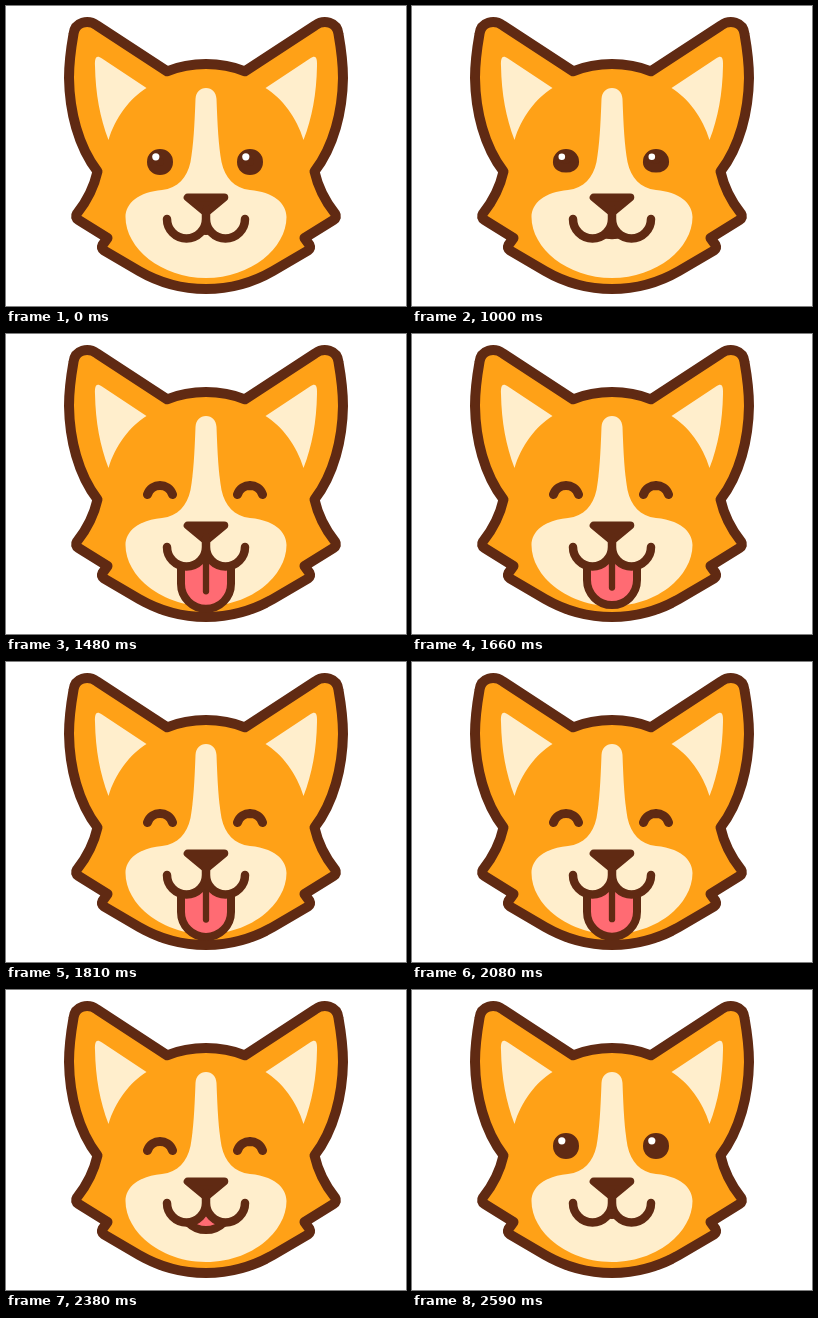
An HTML page that plays this animation: 400x300 px, repeating every 2920 ms.

```html
<!DOCTYPE html>
<html lang="en">
<head>
<meta charset="utf-8">
<title>Happy corgi</title>
<style>
  html, body { margin: 0; width: 100%; height: 100%; overflow: hidden; background: #fff; }
  svg { display: block; width: 100vw; height: 100vh; }
  .line { fill: none; stroke: #602a13; stroke-linecap: round; stroke-linejoin: round; }
</style>
</head>
<body>
<svg viewBox="0 0 400 300">
  <defs>
    <clipPath id="below">
      <path d="M161 213a19.5 19.5 0 0 0 39 0a19.5 19.5 0 0 0 39 0V300H161z"/>
    </clipPath>
    <g id="half">
      <path fill="#ffa117" stroke="#602a13" stroke-width="10" stroke-linejoin="round" d="M200 58
        C186 58 173 60.5 161 65.3 L91 19.5 C82 13 69 16 67.5 28
        C64.5 45 63 58 63 72 C63.5 105 72 140 91.500 165.500
        C88 181 81 195 71 207.500 Q68.500 211.500 72.500 214
        L101.500 232 L96.500 239 Q95 242 98 244.500
        L133 265 C152 276 175 283 200 283"/>
      <path fill="#ffeecc" d="M89 60C88.500 50 91 49 96 52.500L140.500 82
        C124 92 109 112 102.500 134C94 112 89.500 88 89 60z"/>
      <path fill="#ffeecc" d="M200 82C194 82 190 86 189.500 93
        C188.500 120 187.500 139 184.500 156C181 172 172 182 156 184
        C133 186 119.500 197 119.500 211C119.500 242 155 272 200 272z"/>
    </g>
  </defs>

  <use href="#half"/>
  <use href="#half" transform="translate(400) scale(-1 1)"/>

  <g clip-path="url(#below)">
    <g id="tongue">
      <path class="line" style="fill:#ff6b73" stroke-width="8" d="M175 180V250a25 25 0 0 0 50 0V180z"/>
      <path class="line" stroke-width="6.3" d="M200 180V257.500"/>
    </g>
  </g>

  <path class="line" style="fill:#602a13" stroke-width="8" d="M181.700 191.500H218.300L202 205H198z"/>
  <path class="line" stroke-width="8.5" d="M161 213a19.5 19.5 0 0 0 39 0a19.5 19.5 0 0 0 39 0M200 213V205"/>

  <g id="eyes"></g>
</svg>
<script>
const LOOP = 2920, START = 1000, STEP = 30, PHASE = 18, BLINK = 7;
const tongue = document.getElementById('tongue');
const eyes = document.getElementById('eyes');

const clamp = v => Math.max(0, Math.min(1, v));
const mix = (a, b, k) => a + (b - a) * k;
const easeOut = u => Math.sin(u * Math.PI / 2);
const easeInOut = u => u < .5 ? 2 * u * u : 1 - 2 * (1 - u) ** 2;

// A lens: round when open, its lower edge folds up onto the upper one when shut.
function eye(x, shut) {
  const spread = shut * shut;
  const w = mix(8.5, 12.5, spread), y = mix(156, 160.5, spread);
  const inner = w - mix(0, 4.2, spread);
  const top = y - mix(8.5, 9, shut) * 4 / 3;
  const low = y - mix(-8.5, 9, shut) * 4 / 3;
  const l = x - w, r = x + w, a = x - inner, b = x + inner;
  const lens = `M${l} ${y}C${a} ${top} ${b} ${top} ${r} ${y}C${b} ${low} ${a} ${low} ${l} ${y}`;
  const glint = 3.6 * clamp(1.2 - 2 * shut);
  return `<path class="line" style="fill:#602a13" stroke-width="9" d="${lens}"/>` +
    `<circle cx="${x - 4.2}" cy="150.800" r="${glint}" fill="#fff"/>`;
}

// How far the tongue is drawn up: out, two pants, back in.
function lift(n) {
  if (n < PHASE) return 50 * (1 - easeOut(clamp((n + 1) / PHASE)));
  if (n < 2 * PHASE) return 2 * (1 - Math.cos((n - PHASE) / PHASE * 4 * Math.PI));
  return 50 * easeInOut(clamp((n + 1) / PHASE - 2));
}

function draw(ms) {
  const last = 3 * PHASE - 1;
  const n = Math.max(-1, Math.min(last, Math.floor((ms % LOOP - START) / STEP)));
  const shut = clamp(Math.min(n + 1, last - n) / BLINK);
  tongue.setAttribute('transform', `translate(0 ${-lift(n)})`);
  eyes.innerHTML = eye(154, shut) + eye(244, shut);
}

const begin = performance.now();
function tick() {
  draw(performance.now() - begin);
  requestAnimationFrame(tick);
}
tick();
</script>
</body>
</html>
```
